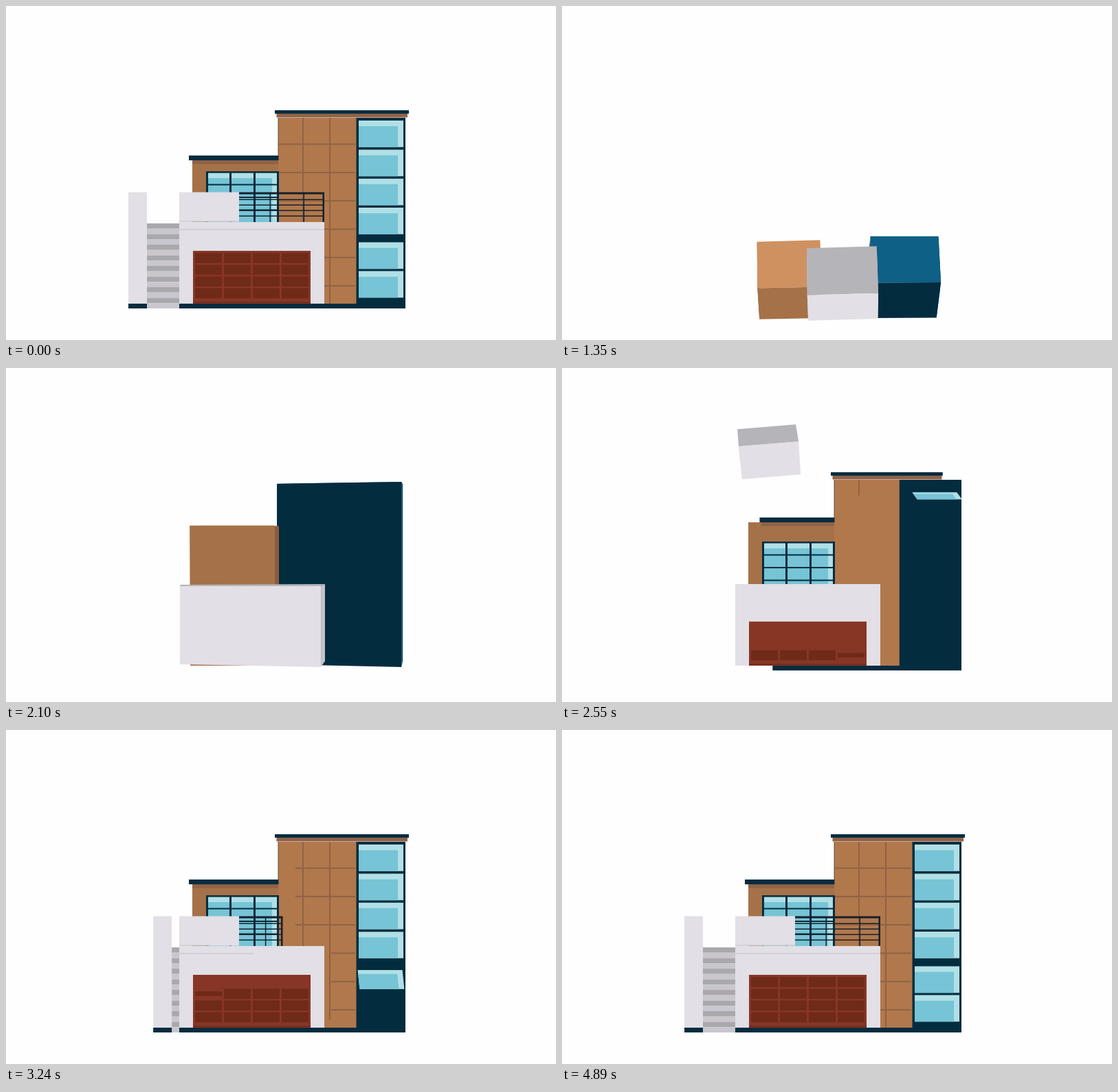
An HTML page with a canvas for the animation above (4.92 s loop, 800x487 px).

```html
<!DOCTYPE html>
<html lang="en">
<head>
<meta charset="utf-8">
<title>House assembly</title>
<style>
  html, body { margin: 0; width: 100%; height: 100%; overflow: hidden; background: #fefefe; }
  canvas { display: block; width: 800px; height: 487px; }
</style>
</head>
<body>
<canvas id="stage" width="800" height="487"></canvas>
<script>
const ctx = document.getElementById('stage').getContext('2d');
const LOOP = 4920;
const C = {
  paper: '#fefefe', navy: '#042c3f', brown: '#b1784c', seam: '#8f6247',
  pale: '#e2dfe6', line: '#c4c1c8', sky: '#76c4d5', shine: '#b0dfe6',
  door: '#873626', panel: '#6f2a18', step: '#c9c6ce', tread: '#a9a9ad'
};

const clamp = v => Math.max(0, Math.min(1, v));
const part = (t, start, dur) => clamp((t - start) / dur);
const out = (t, start, dur) => 1 - (1 - part(t, start, dur)) ** 3;
const inOut = (t, start, dur) => (1 - Math.cos(Math.PI * part(t, start, dur))) / 2;
const mix = (a, b, p) => a + (b - a) * p;

function rect(color, x0, y0, x1, y1) {
  if (x1 <= x0 || y1 <= y0) return;
  ctx.fillStyle = color;
  ctx.fillRect(x0, y0, x1 - x0, y1 - y0);
}

function poly(color, pts) {
  ctx.fillStyle = color;
  ctx.beginPath();
  pts.forEach(([x, y]) => ctx.lineTo(x, y));
  ctx.fill();
}

// Box corners: top face 0-3 clockwise from back left, then front left,
// front right, back right and back left at the base.
const flat = (x0, y0, x1, y1) => [[x0, y0], [x1, y0], [x1, y1], [x0, y1], [x0, y1], [x1, y1], [x1, y0], [x0, y0]];
const upright = (x0, y0, x1, y1) => [[x0, y0], [x1, y0], [x1, y0], [x0, y0], [x0, y1], [x1, y1], [x1, y1], [x0, y1]];
const blend = (a, b, p) => a.map(([x, y], i) => [mix(x, b[i][0], p), mix(y, b[i][1], p)]);

const boxes = [
  { top: '#0e6086', front: C.navy, side: '#0a4a69', x: 452, end: upright(396, 163, 581, 434),
    tilt: [[437, 257], [572, 257], [587, 303], [445, 305], [455, 431], [560, 429], [552, 390], [424, 400]],
    near: [[394, 169], [577, 170], [575, 166], [394, 169], [394, 432], [575, 436], [577, 427], [394, 430]] },
  { top: '#cf9160', front: '#a57148', side: '#8a5c3d', x: 286, end: upright(271, 225, 396, 434),
    tilt: [[276, 291], [380, 281], [389, 330], [279, 339], [291, 439], [388, 431], [381, 400], [288, 395]],
    near: [[267, 230], [397, 231], [390, 230], [267, 230], [268, 434], [390, 434], [397, 434], [268, 434]] },
  { top: '#b5b4b9', front: C.pale, side: '#c6c3ca', x: 369, end: upright(252, 315, 463, 434),
    tilt: [[314, 331], [460, 319], [470, 369], [317, 381], [323, 447], [468, 435], [460, 395], [319, 410]],
    near: [[254, 316], [464, 315], [458, 318], [253, 318], [253, 432], [458, 436], [464, 427], [254, 430]] }
];

function drawBox(box, v) {
  const face = (color, ids) => poly(color, ids.map(i => v[i]));
  face(box.side, [0, 3, 4, 7]);
  face(box.side, [1, 2, 5, 6]);
  face(box.top, [0, 1, 2, 3]);
  face(box.front, [3, 2, 5, 4]);
}

function drawTiles(t) {
  const s = inOut(t, 170, 630), slide = inOut(t, 815, 295);
  [0, 2, 1].forEach(i => {
    const x = mix(413, boxes[i].x + 44, slide);
    rect(boxes[i].top, x - 44 * s, 397 - 37 * s, x + 44 * s, 397 + 37 * s);
  });
}

function drawMassing(t) {
  boxes.forEach(box => {
    const start = flat(box.x, 360, box.x + 88, 434);
    let v, p;
    if (t < 1650) {
      p = part(t, 1110, 540);
      v = blend(start, box.tilt, 1 - Math.cos(p * Math.PI / 2));
    } else if (t < 2100) {
      p = part(t, 1650, 450);
      v = blend(box.tilt, box.near, Math.sin(p * Math.PI / 2));
    } else {
      p = 0;
      v = blend(box.near, box.end, out(t, 2100, 110));
    }
    const swell = 22 * Math.sin(p * Math.PI);
    v[4][1] += swell;
    v[5][1] += swell;
    drawBox(box, v);
  });
}

function drawTower(t, p) {
  rect(C.navy, 396, 163, 581, 434);
  rect(C.brown, 396, 163, 396 + 113.5 * p, 434);
  rect(C.seam, 393.5, 157, 393.5 + 190.5 * p, 162.5);
  rect(C.navy, 391, 152, 391 + 195 * p, 157);

  [432, 471].forEach((x, i) => {
    rect(C.seam, x - 1, 163, x + 1, 163 + 271 * out(t, 2531 + 256 * i, 700));
  });
  const h = out(t, 2965, 700);
  for (let i = 0; i < 6; i++) {
    const y = 201.5 + 41.3 * i;
    rect(C.seam, 508 - (i < 3 ? 112 : 45) * h, y - 1, 508, y + 1);
  }
  rect('#66503f', 395.5, 163, 396.5, 218);

  [167, 209.5, 251.7, 294, 344.5, 386.5].forEach((y, i) => {
    const s = out(t, 2519 + 152 * i, 330);
    if (!s) return;
    const mid = y + 19.4, lean = 5 * (1 - s);
    const pane = (color, x0, x1, top) => {
      const at = (x, f) => [x + lean * f, mid + 19.4 * s * f];
      poly(color, [at(x0, top), at(x1, top), at(x1, 1), at(x0, 1)]);
    };
    pane(C.shine, 513, 578, -1);
    pane(C.sky, 513, 570, -0.58);
  });
}

function drawWing(p) {
  rect('#a57148', 271, 225, 396, 434);
  rect(C.seam, Math.max(271, 396 - 127 * p), 225, 396, 230.5);
  rect(C.navy, 396 - 130 * p, 218, 396.5, 225);

  const y = 314 - 73 * p;
  rect(C.navy, 291, y, 397, 315);
  rect(C.shine, 294, y + 2.5, 394, 315);
  rect(C.sky, 294, y + 10, 387, 315);
  [325, 360].forEach(x => rect(C.navy, x, y, x + 3, 315));
  for (let i = 1; i < 4; i++) rect(C.navy, 291, y + 18.5 * i, 397, y + 18.5 * i + 2);
}

function drawRailing(p) {
  const end = 339 + 124 * p;
  const ink = '#15202c';
  rect(ink, 339, 271.5, end, 274.5);
  for (let i = 0; i < 4; i++) rect(ink, 339, 281.5 + 8 * i, end, 283 + 8 * i);
  [[0, 2.5], [19 + 10 * p, 1.5], [78, 1.5]].forEach(([back, w]) => {
    const x = end - back - w;
    if (x > 339) rect(ink, x, 272, x + w, 315);
  });
}

function drawGarage(t, p) {
  const top = 434 - 77 * p;
  rect(C.door, 272, top, 443, 434);
  rect(C.panel, 272, Math.max(top, 431.5), 443, 433);
  for (let n = 0; n < 16; n++) {
    const row = n >> 2, col = row === 2 ? 3 - n % 4 : n % 4;
    const s = inOut(t, 2215 + 86 * n, 165);
    const x = 275 + 42 * col, mid = 418.8 - 17.1 * row;
    rect(C.panel, x, mid - 7.3 * s, x + 39, mid + 7.3 * s);
  }
}

function drawStairs(t, p) {
  const x = 252 - 74 * p;
  const left = Math.min(581 - 329 * out(t, 2235, 700), p ? x : 581);
  rect(C.navy, left, 434, 581, 441);
  if (!p) return;
  rect(C.pale, x, 271.5, x + 27, 434);
  for (let i = 0; i < 16; i++) {
    const y = 317 + 7.75 * i;
    rect(i % 2 ? C.step : C.tread, x + 27, y, 252, y + 7.75);
  }
}

const block = { top: '#b5b4b9', front: C.pale, side: C.pale };
const blockEnd = upright(252, 271.5, 339, 314.5);
const blockTilt = [[255, 249], [340, 242], [344, 267], [257, 274], [262, 322], [347, 315], [342, 290], [258, 290]];

function drawBlock(t) {
  if (t < 2403) return;
  const q = 1 - out(t, 2403, 700);
  const v = blend(blockEnd, blockTilt, Math.min(1, q / 0.49));
  drawBox(block, v.map(([x, y]) => [x, y - 326 * q]));
}

function drawHouse(t) {
  const p = out(t, 2235, 700), late = out(t, 3107, 630);
  drawTower(t, p);
  drawWing(p);
  if (late) drawRailing(late);
  drawStairs(t, late);
  rect(C.pale, 252, 315, 463, 434);
  drawGarage(t, p);
  drawBlock(t);
  rect(C.line, 252, 313.5, 252 + 87 * late, 314.5);
  rect(C.line, 252, 325.5, 252 + 211 * late, 326.5);
}

function draw(t) {
  rect(C.paper, 0, 0, 800, 487);
  if (t < 60) drawHouse(LOOP);
  else if (t < 1110) drawTiles(t);
  else if (t < 2220) drawMassing(t);
  else drawHouse(t);
}

const began = performance.now();
function tick() {
  draw((performance.now() - began) % LOOP);
  requestAnimationFrame(tick);
}
tick();
</script>
</body>
</html>
```
